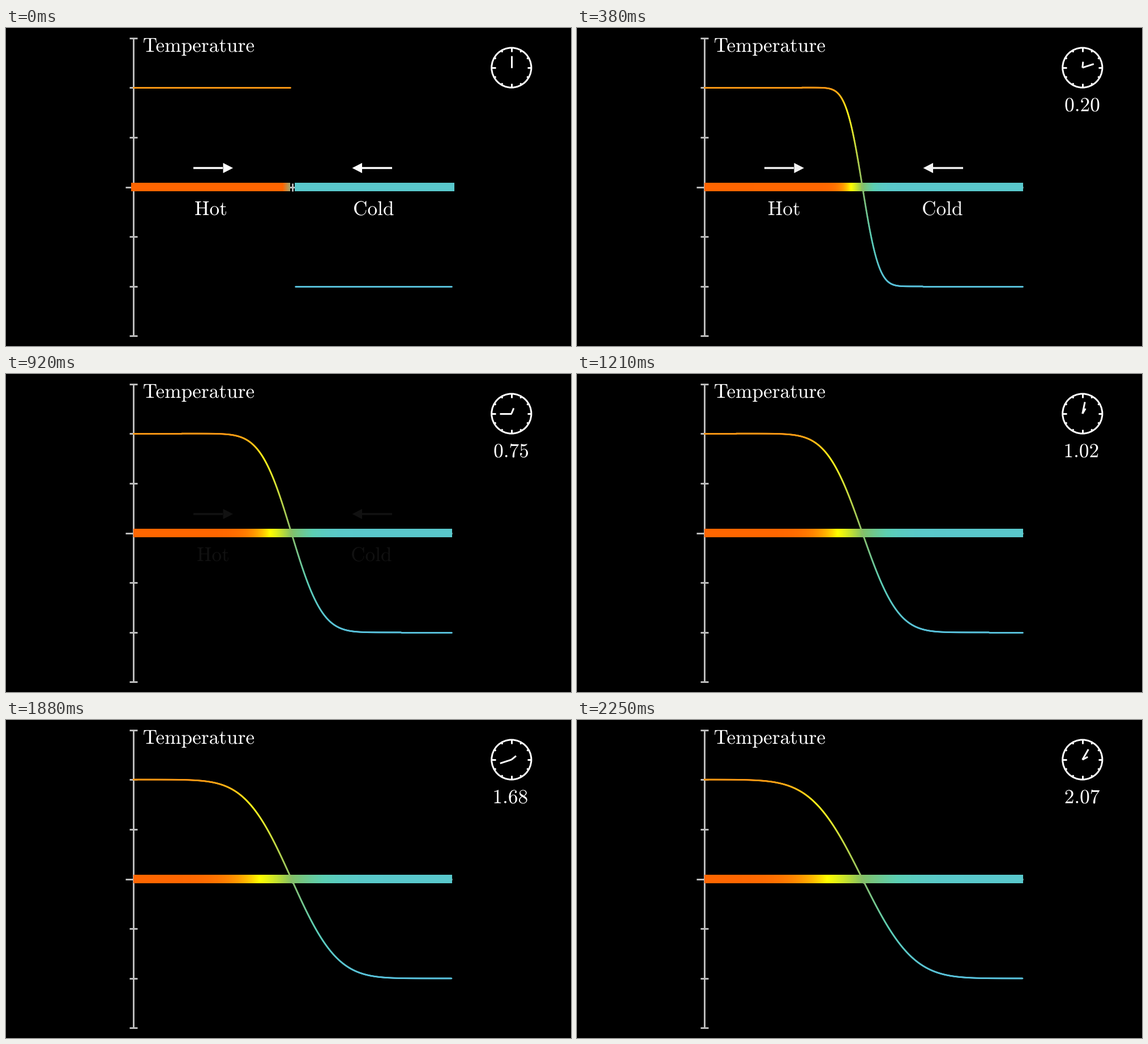
These frames come from a looping animation (998x561 px, 2290 ms). A matplotlib script:

```python
import math

import matplotlib.pyplot as plt
import numpy as np
from matplotlib.animation import FuncAnimation
from matplotlib.collections import LineCollection
from matplotlib.patches import Circle, PathPatch, Polygon
from matplotlib.path import Path
from matplotlib.textpath import TextPath

plt.rcParams["mathtext.fontset"] = "cm"

W, H, DPI = 998, 561, 100
PX = 72 / DPI  # one pixel in points
UNIT = H / 8
LEFT, MID, RIGHT = 225, 506, 788
BASE, AMP = 280.5, 175.4
CROSS = 504.2
CLOCK = np.array([892.8, 70.0])
GREY = "#bbbbbb"
FONT = 35.3

TICKS, TICK_MS = 229, 10
LEAD = 10       # steps of 1/60 s before the clock starts
FADE = 60       # steps taken by the fade of labels and arrows

ROD_STOPS = np.array([(88, 196, 221), (92, 208, 179), (131, 193, 103),
                      (255, 255, 0), (255, 0, 0)]) / 255
LINE_STOPS = np.array([(88, 192, 218), (92, 205, 180), (140, 190, 105),
                       (255, 245, 25), (250, 150, 20)]) / 255
SEAM = np.array([165, 165, 110]) / 255


def clamp(v):
    return min(max(v, 0), 1)


def smooth(t):
    edge = 1 / (1 + math.exp(5))
    rise = 1 / (1 + math.exp(-10 * (clamp(t) - 0.5)))
    return clamp((rise - edge) / (1 - 2 * edge))


def blend(values, at, stops):
    return np.column_stack([np.interp(values, at, c) for c in stops.T])


def rod_color(temp):
    return blend(0.5 + 0.4 * temp, np.linspace(0, 1, 5), ROD_STOPS)


def line_color(temp):
    return blend(temp, [-1, -0.5, 0, 0.75, 1], LINE_STOPS)


def temperature(x, t):
    width = math.sqrt(4700 * t + 100)
    return np.array([-math.erf((v - CROSS) / width) for v in x])


def lettering(text, x, y):
    """Outline of the text with its ink starting at x, baseline at y."""
    path = TextPath((0, 0), r"$\mathrm{%s}$" % text, size=FONT)
    verts = path.vertices * (1, -1)
    verts = verts + (x - path.get_extents().x0, y)
    return Path(verts, path.codes)


fig = plt.figure(figsize=(W / DPI, H / DPI), dpi=DPI, facecolor="black")
ax = fig.add_axes([0, 0, 1, 1])
ax.set_xlim(0, W)
ax.set_ylim(H, 0)
ax.axis("off")
ax.autoscale(False)


def stroke(p, q, color="white", width=3.0, z=1):
    line, = ax.plot([p[0], q[0]], [p[1], q[1]], color=color, lw=width * PX,
                    solid_capstyle="butt", zorder=z)
    return line


def write(text, x, y):
    patch = PathPatch(lettering(text, x, y), fc="white", lw=0, zorder=5)
    return ax.add_patch(patch)


def arrow(tail, tip):
    way = math.copysign(1, tip - tail)
    neck = tip - way * 17.5
    head = Polygon([(tip, 247), (neck, 238), (neck, 256)], fc="white", lw=0,
                   zorder=4)
    return [stroke((tail, 247), (neck, 247), width=3.5, z=4),
            ax.add_patch(head)]


def spoke(angle, r0, r1):
    way = np.array([math.sin(angle), -math.cos(angle)])
    return CLOCK + r0 * way, CLOCK + r1 * way


def rod_half():
    return ax.imshow(np.zeros((1, 2, 3)), extent=(0, 1, 1, 0), aspect="auto",
                     interpolation="nearest", zorder=2)


# Axes
stroke((LEFT, 17), (LEFT, 544), GREY)
for i in range(-3, 4):
    y = BASE + i * 1.25 * UNIT
    stroke((LEFT - 7, y), (LEFT + 7, y), GREY)
stroke((LEFT - 14, BASE), (RIGHT, BASE), GREY)
stroke((MID, BASE - 7), (MID, BASE + 7), GREY)

# The kerned first letter is placed apart
write("T", 243, 42.2)
write("emperature", 265.4, 42.2)

# Clock
ax.add_patch(Circle(CLOCK, UNIT / 2, fill=False, ec="white", lw=3 * PX))
for i in range(12):
    size = 0.1 if i % 3 == 0 else 0.05
    stroke(*spoke(i * math.pi / 6, UNIT * (0.5 - size), UNIT / 2))
hour = stroke(CLOCK, CLOCK)
minute = stroke(CLOCK, CLOCK)
counter = write("0.00", 862.5, 146.9)

# Rod, graph and fading parts
left_rod, right_rod = rod_half(), rod_half()
graph = LineCollection([], lw=2.8 * PX, capstyle="round", zorder=3)
ax.add_collection(graph, autolim=False)
hot = write("Hot", 338, 330.2)
cold = write("Cold", 611, 330.2)
fading = arrow(331, 401) + arrow(682, 611.5) + [hot, cold]

ax.set_xlim(0, W)
ax.set_ylim(H, 0)

LEFT_X = np.arange(LEFT, MID) + 0.5
RIGHT_X = np.arange(MID, RIGHT) + 0.5
GRAPH_X = np.linspace(LEFT, 787, 563)


def set_rod(half, colors, x0, x1):
    half.set_data(colors[None])
    half.set_extent((x0, x1, 288, 273))


def set_hand(hand, turns, length):
    p, q = spoke(2 * math.pi * turns, 0, length)
    hand.set_data([p[0], q[0]], [p[1], q[1]])


def draw(tick):
    shot = ((2 * tick + 1) * 3 - 1) // 25        # 24 pictures per second
    clock_step = math.floor(2.5 * shot) - LEAD
    # the simulation rests for one step when the fade ends
    step = clock_step - (clock_step > FADE)
    t = step / 60
    joined = step >= 0

    gap = 0 if joined else 2 * UNIT * (1 - smooth(1 + (2.5 * shot - LEAD) / 60))
    if joined:
        left, right = temperature(LEFT_X, t), temperature(RIGHT_X, t)
        temp = temperature(GRAPH_X, t)
    else:
        left, right = np.ones(len(LEFT_X)), -np.ones(len(RIGHT_X))
        temp = np.where(GRAPH_X < MID, 1.0, -1.0)

    left_colors = rod_color(left)
    if not joined:
        mix = np.linspace(0, 1, 14)[:, None]
        left_colors[-14:] = left_colors[-14:] * (1 - mix) + SEAM * mix
    set_rod(left_rod, left_colors, LEFT - gap, MID - gap)
    set_rod(right_rod, rod_color(right), MID + gap, RIGHT + gap)

    points = np.column_stack([GRAPH_X, BASE - AMP * temp])
    pieces = np.stack([points[:-1], points[1:]], axis=1)
    middle = (temp[:-1] + temp[1:]) / 2
    keep = joined | (np.abs(GRAPH_X[:-1] - MID) > 4)
    graph.set_segments(pieces[keep])
    graph.set_color(line_color(middle[keep]))

    hot.set_path(lettering("Hot", 338 - gap, 330.2))
    cold.set_path(lettering("Cold", 611 + gap, 330.2))
    for part in fading:
        part.set_alpha(1 - smooth(step / FADE))
        part.set_visible(step < FADE)

    turns = max(clock_step, 0) / 60
    set_hand(minute, turns, 0.3 * UNIT)
    set_hand(hour, turns / 12, 0.15 * UNIT)
    counter.set_visible(joined)
    counter.set_path(lettering("%.2f" % max(t, 0), 862.5, 146.9))
    return []


anim = FuncAnimation(fig, draw, frames=TICKS, interval=TICK_MS, repeat=True,
                     repeat_delay=0, blit=False)
plt.show()
```
